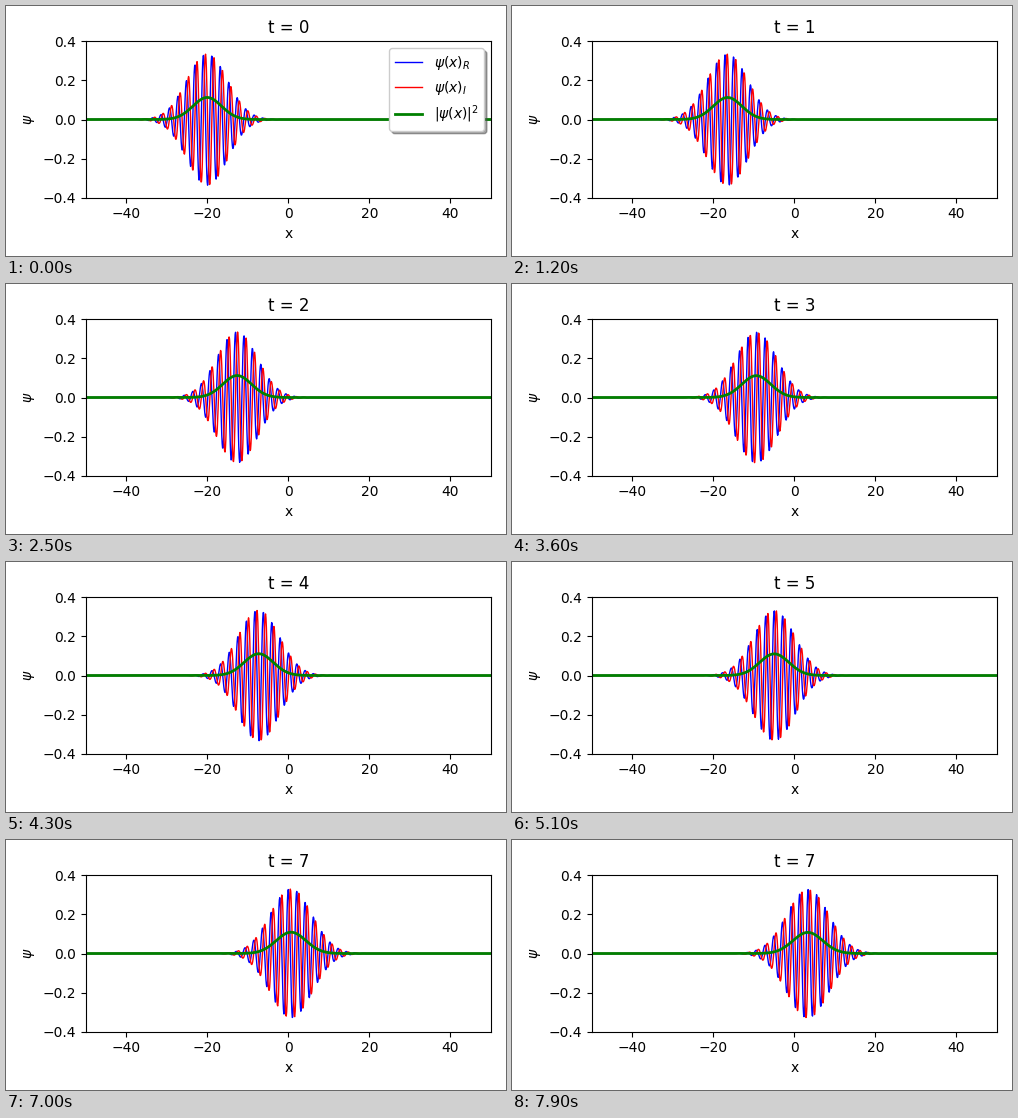
Write a matplotlib script that moves like this. It is 500 px wide and 250 px high and loops after 8 s.

```python
import numpy as np
import matplotlib.pyplot as plt
from matplotlib.animation import FuncAnimation

FRAMES, INTERVAL = 80, 100
DT = 0.1
DX = 0.1
X0, K0, WIDTH = -20.0, 3.0, 5.0

# Free Gaussian wave packet on a finite-difference grid
x = np.arange(-50, 50 + DX / 2, DX)
grid = x[:-1]
psi0 = np.exp(-(grid - X0) ** 2 / (2 * WIDTH ** 2) + 1j * K0 * grid)
psi0 /= np.sqrt(WIDTH * np.sqrt(np.pi))
spectrum = np.fft.fft(psi0)
k = 2 * np.pi * np.fft.fftfreq(grid.size, DX)
omega = (1 - np.cos(k * DX)) / DX ** 2


def packet(t):
    psi = np.fft.ifft(spectrum * np.exp(-1j * omega * t))
    return np.append(psi, psi[0])


fig, ax = plt.subplots(figsize=(5, 2.5), dpi=100)
real, = ax.plot([], [], "b", lw=1, label=r"$\psi(x)_R$")
imag, = ax.plot([], [], "r", lw=1, label=r"$\psi(x)_I$")
prob, = ax.plot([], [], "g", lw=2, label=r"$|\psi(x)|^2$")
ax.set(xlim=(-50, 50), ylim=(-0.4, 0.4), xlabel="x", ylabel=r"$\psi$")
title = ax.set_title("t = 0")
legend = ax.legend(loc="upper right", shadow=True)
fig.tight_layout()
fig.subplots_adjust(left=0.1591, top=0.8587)


def update(i):
    psi = packet(i * DT)
    real.set_data(x, psi.real)
    imag.set_data(x, psi.imag)
    prob.set_data(x, np.abs(psi) ** 2)
    title.set_text(f"t = {i // 10}")
    legend.set_visible(i == 0)
    return real, imag, prob, title, legend


anim = FuncAnimation(fig, update, frames=FRAMES, interval=INTERVAL,
                     repeat=True, repeat_delay=0)
plt.show()
```
